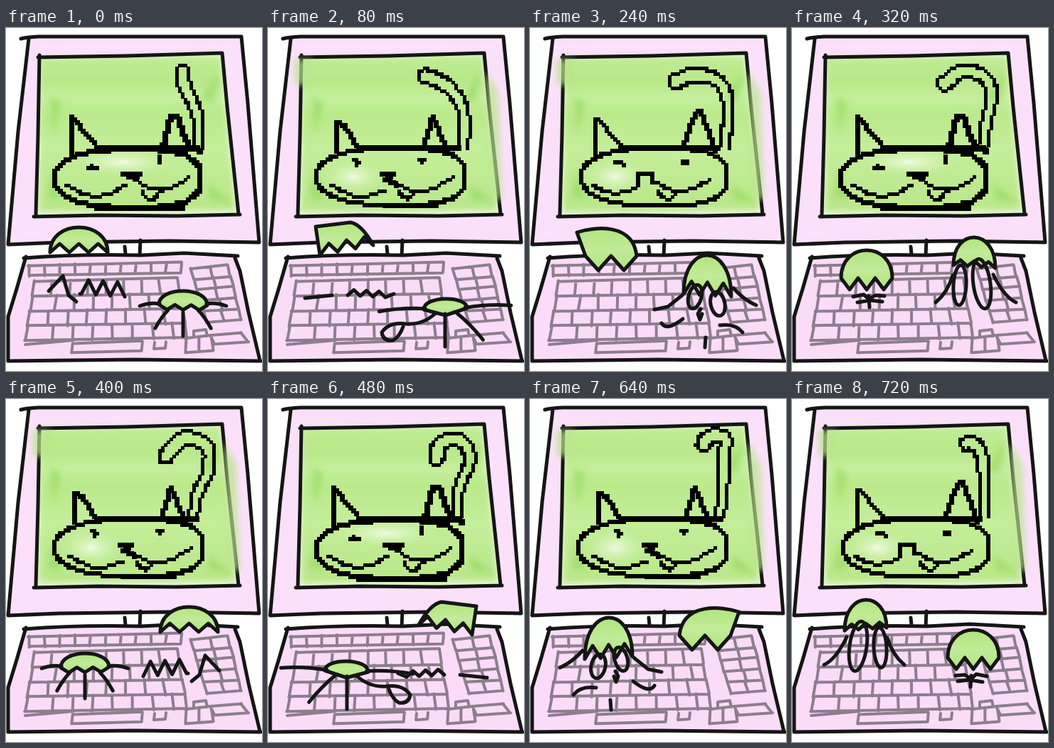
Animation, 360 px wide and 480 px high, one loop 800 ms. Source, as an HTML page:

```html
<!DOCTYPE html>
<html lang="en">
<head>
<meta charset="utf-8">
<title>Typing cat</title>
<style>
  html, body { margin: 0; width: 100%; height: 100%; overflow: hidden; background: #fff; }
  svg { display: block; width: 360px; height: 480px; }
  .ink { fill: none; stroke: #151515; stroke-width: 5; stroke-linecap: round; stroke-linejoin: round; }
  .keys { fill: none; stroke: #8d7e8d; stroke-width: 4; stroke-linecap: round; stroke-linejoin: round; }
  .paw { fill: url(#pawFill); }
  .pose { visibility: hidden; animation: show 800ms step-end infinite; animation-delay: calc(var(--i) * 80ms - 800ms); }
  @keyframes show { 0% { visibility: visible; } 10%, 100% { visibility: hidden; } }
</style>
</head>
<body>
<svg viewBox="0 0 360 480">
  <defs>
    <linearGradient id="screen" x2="0" y2="1">
      <stop offset="0" stop-color="#c0ec95"/>
      <stop offset=".17" stop-color="#b8e888"/>
      <stop offset=".27" stop-color="#c6ef9e"/>
      <stop offset=".38" stop-color="#bae98a"/>
      <stop offset=".6" stop-color="#c4ee9a"/>
      <stop offset="1" stop-color="#b8e788"/>
    </linearGradient>
    <radialGradient id="glow">
      <stop offset="0" stop-color="#f4fde9" stop-opacity=".9"/>
      <stop offset="1" stop-color="#c8f0a2" stop-opacity="0"/>
    </radialGradient>
    <linearGradient id="pawFill" x2="0" y2="1">
      <stop offset="0" stop-color="#b0e57d"/>
      <stop offset=".5" stop-color="#c1eb98"/>
      <stop offset="1" stop-color="#b0e37d"/>
    </linearGradient>
    <filter id="soft" x="-40%" y="-40%" width="180%" height="180%"><feGaussianBlur stdDeviation="4"/></filter>
  </defs>

  <!-- monitor -->
  <path fill="#fce0fb" d="M31 13 331 12 355 300 4 304Z"/>
  <path fill="#eaf6dc" d="M47 39 303 36 326 261 44 262Z"/>
  <path fill="url(#screen)" filter="url(#soft)" d="M47 41 302 38 323 255 46 257Z"/>
  <path fill="#92d65c" filter="url(#soft)" opacity=".6" d="M62 95 78 105 66 150ZM58 238 66 195 78 240ZM272 100 298 62 292 104ZM284 218 318 244 286 240Z"/>
  <path class="ink" d="M21 15Q28 13 46 12L331 12 340 105 356 300 230 298 75 300 3 303 17 145 32 15"/>
  <path class="ink" d="M45 41Q110 40 170 39L304 35 311 110 327 260M47 38 45 150 42 261M39 264 130 262 240 263 329 261"/>

  <!-- stand and keyboard -->
  <path class="ink" d="M167 306 168 316M189 297 188 319"/>
  <path fill="#fadcf9" d="M27 321 190 317 323 321 357 465 3 466V404Z"/>
  <path class="keys" id="keys"/>
  <path class="ink" d="M25 322Q100 316 190 318L250 315 326 319M322 322 329 340 341 398 357 465M28 320 15 365 3 404V466L180 464 358 466"/>

  <g id="poses"></g>
</svg>
<script>
const CELL = 4, { PI, sin, cos, abs, sign, hypot } = Math;
const range = n => [...Array(n).keys()];
const mix = (a, b, t) => a + (b - a) * t;
const mixPts = (p, q, t) => p.map(([x, y], i) => [mix(x, q[i][0], t), mix(y, q[i][1], t)]);
const pts = text => text.split(' ').map(p => p.split(',').map(Number));

// ---- pixel cat ----

// Draws a polyline as square dots on a coarse grid.
function pixels(line, size = 6) {
  const cells = new Set();
  line.forEach((p, i) => {
    const q = line[Math.max(0, i - 1)];
    const n = Math.max(1, Math.ceil(Math.max(abs(p[0] - q[0]), abs(p[1] - q[1])) / CELL));
    for (let k = 0; k <= n; k++) {
      cells.add([0, 1].map(a => Math.round(mix(q[a], p[a], k / n) / CELL) * CELL).join(' '));
    }
  });
  const d = [...cells].map(c => `M${c}h${size}v${size}h-${size}z`).join('');
  return `<path transform="translate(${-size / 2} ${-size / 2})" shape-rendering="crispEdges" d="${d}"/>`;
}

const dots = (text, size) => pixels(pts(text), size);

// Hanging curve for smiles and tongues.
const smile = (x0, y0, x1, y1, sag) =>
  pixels(range(13).map(k => [mix(x0, x1, k / 12), mix(y0, y1, k / 12) + sag * sin(PI * k / 12)]), 5);

// Superellipse, rounder on the left than on the right.
function skull(left, right, top, bottom, size) {
  return pixels(range(49).map(k => {
    const c = cos(k * PI / 24), s = sin(k * PI / 24), e = c < 0 ? 0.9 : 0.68;
    return [mix(left, right, (1 + sign(c) * abs(c) ** e) / 2), mix(top, bottom, (1 + sign(s) * abs(s) ** e) / 2)];
  }), size);
}

const glow = (x, y, rx, ry) => `<ellipse cx="${x}" cy="${y}" rx="${rx}" ry="${ry}" fill="url(#glow)"/>`;

const heads = {
  A: glow(165, 188, 75, 20) + skull(67, 273, 169, 251, 7) +
    dots('128,168 270,170', 9) + dots('128,251 246,251', 8) +
    dots('91,180 91,125 124,160', 7) + dots('220,168 232,122 240,122 257,168', 8) +
    dots('114,197 127,197') + dots('120,193 121,193', 5) + dots('216,178 216,186') +
    dots('164,204 188,204 172,209 182,209', 7) +
    smile(85, 220, 168, 220, 15) + smile(180, 212, 257, 208, 16) + smile(191, 228, 215, 228, 12),
  B: glow(120, 208, 45, 26) + skull(71, 277, 168, 249, 6) +
    dots('128,166 262,168', 8) +
    dots('92,178 92,126 127,163') + dots('215,164 232,120 240,115 260,170', 7) +
    dots('118,187 130,191') + dots('214,186 218,186', 8) +
    dots('153,218 153,204 172,204 172,216') +
    smile(88, 219, 153, 219, 12) + smile(173, 214, 251, 212, 15) + smile(178, 228, 208, 228, 11),
  C: glow(120, 208, 45, 26) + skull(67, 277, 168, 248, 6) +
    dots('128,168 268,169', 8) + dots('164,248 236,248', 7) +
    dots('97,170 97,132 104,134 124,164', 7) + dots('218,168 232,122 251,170', 7) +
    dots('121,183 127,186 124,191', 5) + dots('210,184 218,184 214,189', 5) +
    dots('160,204 176,204 164,210 180,218', 7) +
    smile(89, 220, 165, 226, 12) + smile(172, 212, 260, 208, 18) + smile(182, 229, 208, 229, 9)
};

// Centre lines of the tail from base to tip, keyed by step; the rest is interpolated.
const tailKeys = [
  [0, pts('270,172 271,138 264,108 253,86 248,72 248,62')],
  [2, pts('276,174 282,130 272,92 248,74 218,70 194,72')],
  [5, pts('262,172 268,134 284,98 282,66 250,55 224,80')],
  [6, pts('264,172 268,125 284,84 270,58 242,62 236,84')],
  [8, pts('266,172 271,122 272,78 274,56 256,50 243,62')]
];
tailKeys.push([10, tailKeys[0][1]]);

function spline(p, t) {
  const last = p.length - 1, i = Math.min(last - 1, Math.floor(t * last)), u = t * last - i;
  const [a, b, c, d] = [-1, 0, 1, 2].map(k => p[Math.max(0, Math.min(last, i + k))]);
  return [0, 1].map(k => b[k] + u * (c[k] - a[k] + u * (2 * a[k] - 5 * b[k] + 4 * c[k] - d[k] + u * (3 * (b[k] - c[k]) + d[k] - a[k]))) / 2);
}

// A tube around the centre line, widening to a round tip.
function tail(step) {
  const next = tailKeys.findIndex(([s]) => s > step);
  const [[s0, p0], [s1, p1]] = tailKeys.slice(next - 1, next + 1);
  const mid = mixPts(p0, p1, (step - s0) / (s1 - s0));
  const edge = (t, turn) => {
    const [x, y] = spline(mid, t), [u, v] = spline(mid, t - 0.02), len = hypot(x - u, y - v), r = 6 + 4 * t;
    const dx = (x - u) / len, dy = (y - v) / len;
    return [x + r * (dx * cos(turn) - dy * sin(turn)), y + r * (dy * cos(turn) + dx * sin(turn))];
  };
  const ts = range(20).map(k => 0.05 + k / 20);
  return pixels([
    ...ts.map(t => edge(t, PI / 2)),
    ...range(5).map(k => edge(1, PI / 4 * (2 - k))),
    ...ts.reverse().map(t => edge(t, -PI / 2))
  ], 5);
}

// ---- hands ----

const ink = d => `<path class="ink" d="${d}"/>`;

// Zigzag from one point to another with n teeth of height h.
const zig = (x0, y0, x1, y1, n, h) => range(2 * n + 1).map(k =>
  `L${mix(x0, x1, k / (2 * n))} ${mix(y0, y1, k / (2 * n)) + (k % 2 ? h : 0)}`).join('');

const dome = (x0, y0, x1, y1, top) => {
  const c = top - ((y0 + y1) / 2 - top) / 3;
  return `M${x0} ${y0}C${x0} ${c} ${x1} ${c} ${x1} ${y1}`;
};

const shape = (top, teeth) => `<path class="ink paw" d="${top}${teeth}Z"/>`;

const paw = (x0, y0, x1, y1, top, n, h) => shape(dome(x0, y0, x1, y1, top), zig(x1, y1, x0, y0, n, h));

// Fingers radiating between two ellipses.
const fan = (x, y, [rx, ry], [RX, RY], angles) => ink(angles.map(deg => {
  const c = cos(deg * PI / 180), s = sin(deg * PI / 180);
  return `M${x + rx * c} ${y + ry * s}Q${x + (rx + RX) / 2 * c} ${y + (ry + RY) / 2 * s - 4} ${x + RX * c} ${y + RY * s}`;
}).join(''));

const loop = (x, y, rx, ry, tilt) =>
  `<ellipse class="ink" cx="${x}" cy="${y}" rx="${rx}" ry="${ry}" transform="rotate(${tilt} ${x} ${y})"/>`;

// Each gesture has a left and a right hand.
const reach = [
  paw(62, 314, 143, 314, 279, 3, -12) + ink('M60 368 80 347 88 374 99 383M104 372' + zig(106, 372, 167, 376, 3, -20)),
  paw(215, 387, 283, 388, 368, 3, 7) + fan(249, 385, [33, 13], [61, 46], [5, 50, 90, 130, 175])
];
const stretch = [
  shape('M60 319Q64 284 76 274Q110 267 140 274L152 288', zig(148, 301, 62, 319, 3, -14)),
  shape('M207 387Q232 352 251 348Q275 352 297 383', 'Q250 392 207 387') +
    fan(251, 386, [40, 5], [76, 40], [3, 55, 90, 125, 150, 170])
];
const hang = [
  shape('M78 319 66 286C90 278 145 272 150 319', zig(150, 319, 78, 319, 2, 20)),
  paw(216, 372, 283, 376, 318, 3, -18) + loop(232, 376, 9, 17, 15) + loop(264, 386, 10, 17, -12) +
    ink('M214 374 194 390 175 394M240 393 236 400 239 408 242 400M185 413Q192 425 215 407M247 433 246 447M267 416Q289 413 299 426M286 364Q300 380 318 388')
];
const splay = [
  shape('M212 316Q228 287 244 284L293 290', zig(287, 330, 212, 316, 3, -14)) +
    ink('M183 384' + zig(195, 389, 248, 386, 3, -8) + 'M270 386 308 390'),
  paw(80, 380, 141, 382, 367, 1, 9) + fan(111, 380, [28, 8], [93, 54], [5, 90, 125, 184]) +
    ink('M124 387Q143 404 166 402Q190 399 200 414Q198 427 184 425Q175 420 170 406')
];
const lift = [
  paw(74, 324, 133, 320, 281, 3, -8) + loop(93, 346, 12, 35, 8) + loop(124, 348, 9, 28, -3) +
    ink('M77 333Q62 364 45 372M134 334Q141 358 158 372'),
  paw(219, 362, 291, 362, 323, 3, 16) + ink('M230 387 243 386 252 392 259 385 274 388M233 395 250 393 268 396M252 387 251 403')
];

// The second half of the cycle swaps the hands by mirroring them.
function hands([left, right], side) {
  const flip = (g, dy) => `<g transform="matrix(-1 0 0 1 360 ${dy})">${g}</g>`;
  return side ? flip(left, 12 * side) + flip(right, -12 * side) : left + right;
}

const poses = [
  ['A', reach, 0], ['C', splay, -1], ['A', stretch, 0], ['B', hang, 0], ['A', lift, 1],
  ['C', reach, 1], ['A', splay, 0], ['B', stretch, 1], ['C', hang, 1], ['B', lift, 0]
];

const bleed = '<path filter="url(#soft)" fill="#b9e58c" opacity=".7" d="M36 44H62V80H38ZM306 60 324 90 329 240 312 240Z"/>';

document.getElementById('poses').innerHTML = poses.map(([head, gesture, side], i) =>
  `<g class="pose" style="--i:${i}">${head === 'A' ? '' : bleed}${heads[head]}${tail(i)}${hands(gesture, side)}</g>`
).join('');

// ---- keyboard ----

let seed = 7;
const wobble = n => ((seed = seed * 16807 % 2147483647) / 2147483647 - 0.5) * n;

// A slanted grid of keys; rows get taller or shorter with the given power.
function grid(cols, rows, x0, x1, y0, y1, leanLeft, leanRight) {
  const at = (u, v) => `${mix(x0 + leanLeft * v, x1 + leanRight * v, u) + wobble(2)} ${mix(y0, y1, v) - 4 * u + wobble(2)}`;
  let d = '';
  for (let r = 0; r <= rows; r++) {
    d += `M${at(0, r / rows)}L${at(1, r / rows)}`;
    for (let c = 0; c <= cols && r < rows; c++) {
      const u = c / cols + (c % cols ? (r % 2) * 0.04 : 0);
      d += `M${at(u, r / rows)}L${at(u, (r + 1) / rows)}`;
    }
  }
  return d;
}

document.getElementById('keys').setAttribute('d',
  grid(10, 1, 32, 247, 332, 347, 1, -1) +
  grid(8, 4, 40, 240, 354, 438, -13, 15) +
  grid(2, 5, 260, 312, 336, 412, 22, 18) +
  grid(1, 1, 94, 191, 442, 455, -2, 0) +
  grid(2, 1, 253, 288, 435, 455, 0, 3) +
  grid(1, 1, 287, 331, 430, 443, 6, 10) +
  'M209 440 208 449 224 448 225 439M264 433V424L281 422 283 431M27 443 95 437');
</script>
</body>
</html>
```
